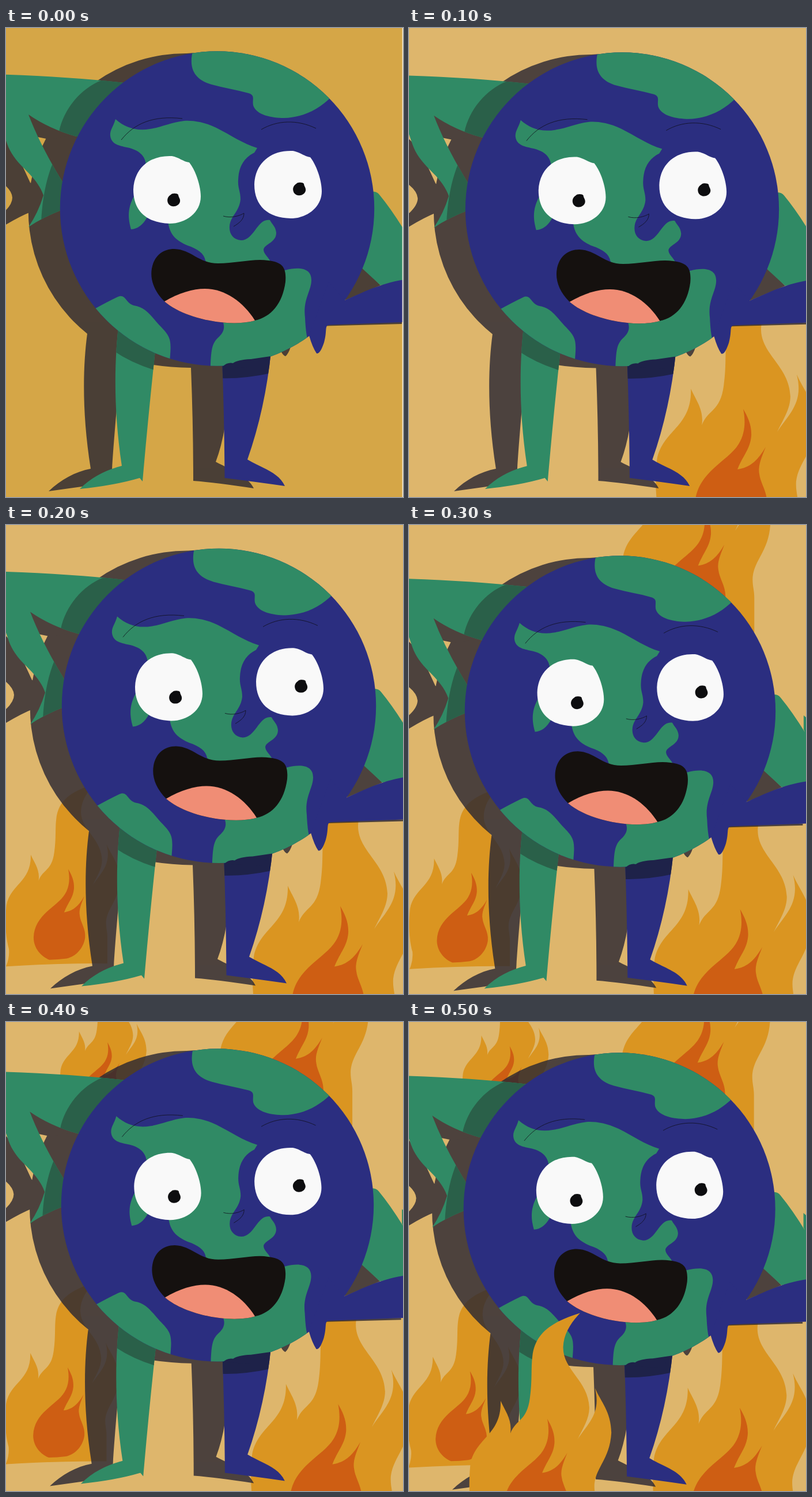
Animation of 689 by 813 pixels, one loop 0.6 s. Source, as an HTML page:

```html
<!DOCTYPE html>
<html lang="en">
<head>
<meta charset="utf-8">
<title>Burning globe</title>
<style>
html, body { margin: 0; width: 100%; height: 100%; overflow: hidden; }
svg { display: block; width: 100vw; height: 100vh; }
.land { fill: #308a65; }
.sea { fill: #2b2e80; }
.landShade { fill: #2a6049; }
.seaShade { fill: #1e2249; }
.shadow { fill: #292632; opacity: .8; }
.eye { fill: #f9f9f9; }
.dark { fill: #15110f; }
.pupil { fill: #0d0d0f; }
.line { fill: none; stroke: #10101c; stroke-width: .8; }
</style>
</head>
<body>
<svg viewBox="0 0 689 813" preserveAspectRatio="none">
  <defs>
    <g id="flame">
      <path fill="#da9521" d="M-151 236 Q-142 215 -144 194 C-152 165 -154 130 -150 88 C-140 36 -89 32 -91 -35
        C-82 -15 -68 2 -72 28 C-61 0 -40 5 -34 -40 C-29 -75 -32 -100 -29 -122 C-24 -165 5 -188 64 -206
        C45 -186 32 -165 31 -140 C30 -95 80 -75 82 -22 C82 0 69 19 59 40 C78 10 106 -10 93 -60
        C105 -32 124 -15 125 27 C122 78 96 92 92 126 C91 142 95 150 95 165 V229 Q-20 228 -151 236Z"/>
      <path fill="#ce5e13" d="M0 0 C8 14 15 28 14 47 C12 70 0 80 -10 105 C10 102 24 92 39 66
        C33 82 25 98 28 113 C30 130 43 145 41 166 C38 190 20 212 -4 217 Q-25 220 -46 220
        C-66 212 -84 192 -84 166 C-82 110 -27 92 -8 61 C4 42 4 20 0 0Z"/>
    </g>
    <clipPath id="disc"><circle cx="366.5" cy="313" r="272.7"/></clipPath>
    <path id="arm" d="M-10 80.5 Q105 84 205 95 L250 200 L122 188 Q75 175 39 150 Q60 205 100 270 V314
      Q62 329 39 345 Q56 320 65 290 C58 270 44 256 27 239 C12 223 5 211 0 195 L-10 165Z"/>
    <clipPath id="armArea"><use href="#arm"/></clipPath>
    <path id="landLeg" d="M196 510 C188 575 186 660 201 759 C175 766 150 777 128 799 Q188 793 232 780 L237 786 Q246 680 260 550Z"/>
    <path id="seaLeg" d="M375 570 Q379 680 379.5 780 Q435 787 484 794 C473 770 446 764 419 748 Q450 660 460 560Z"/>
    <clipPath id="legArea"><use href="#landLeg"/><use href="#seaLeg"/></clipPath>
  </defs>

  <rect id="sky" width="689" height="813"/>
  <g id="scene">
    <g id="back"></g>

    <g class="shadow">
      <path d="M313 44 A273 273 0 0 0 141 530 C133 590 132 670 147 764 C120 769 95 783 74 803 L135 794.5 L184 785
        V766 C186 730 191 670 200 572 Q255 588 321 589 Q325 690 325 785 Q365 788 430 798 C420 776 386 764 364 752
        Q374 726 380 690 L383 585 A273 273 0 0 0 313 44Z"/>
      <path d="M30 140 L125 185 L75 193 L50 188Z"/>
      <path d="M-10 185 L0 195 L22 225 L42 268 L70 290 L45 318 Q20 328 -10 347 V325 Q11 308 11 294 Q10 280 -10 266Z"/>
      <path d="M588 472 L616 412 L650 446Z M477 560 Q481 568 485 569 Q490 565 494 553Z M556 510 H687 V513 L556 516.5Z"/>
    </g>

    <use href="#arm" class="land"/>
    <path class="landShade" clip-path="url(#armArea)" d="M92 180 C100 140 130 105 165 91 L230 85 V200 H92Z
      M61 337 C63 290 72 255 83 230 L120 270 V330Z"/>
    <path class="land" d="M630 284 Q643 282 648 289 Q672 318 700 365 V437 L650 446 L600 400Z M688.5 320 L700 330 V370 L688.5 345Z"/>

    <use href="#landLeg" class="land"/>
    <use href="#seaLeg" class="sea"/>
    <g clip-path="url(#legArea)">
      <path class="landShade" d="M180 555 Q217 582 265 595 V480 H180Z"/>
      <path class="seaShade" d="M370 607 Q415 609 470 596 V540 H370Z"/>
    </g>

    <circle class="sea" cx="366.5" cy="313" r="272.7"/>
    <g class="land" clip-path="url(#disc)">
      <path d="M325 36 C317 66 323 88 357 98 C378 104 400 107 421 113 C433 117 427 123 429 134 C434 151 462 156 482 156 C515 155 542 142 565 119 L540 30Z"/>
      <path d="M190 158 C186 172 180 177 181 187 C183 202 197 204 210 207 C230 211 242 221 243 238 L270 290
        L281 335 C284 360 297 369 315 377 C333 383 344 391 346 403 L380 450 L484 420
        C511 413 530 417 530 437 C530 456 515 470 519 502 Q520 526 523 538 L500 610 H354
        C356 560 355 548 370 535 C377 528 381 520 376 508 L470 430 L458 403
        C454 396 447 391 447 384 C449 374 469 372 469 355 C468 344 462 341 458 333
        C436 329 431 368 408 368 C394 367 387 356 388 344 C389 326 405 319 407 297 C407 283 402 278 403 263
        C404 238 415 224 431 216 L436 208 C410 200 391 186 365 173 C342 162 322 160 309 161
        C285 164 270 172 250 175 C226 179 207 173 190 158Z"/>
      <path d="M226 285 C212 307 210 325 217 349 Q234 348 245 328Z"/>
      <path d="M150 489 Q175 475 194 466 C208 460 207 477 222 481 C243 484 252 500 266 515 C288 537 287 541 284 580 L200 600Z"/>
    </g>
    <path class="seaShade" d="M376 587 Q384 579 394 581 Q402 575 425 574 L459 569 L440 590Z"/>
    <path class="sea" d="M560 440 L588 472 C620 458 655 440 700 435 V509.5 L562 514.5 C552 515 558 524 552 545 Q545 566 539 564 Q532 554 526 533Z"/>

    <g id="eyes"></g>
    <g class="line">
      <path d="M200 194 C222 166 255 151 306 157 M443 176 C470 160 505 158 538 174"/>
      <path d="M377 326 C390 330 405 326 413 321 C413 332 405 338 395 344"/>
    </g>
    <path class="dark" d="M292 383 C322 384 334 408 368 408 C400 408 430 399 455 403 C480 406 487 415 485 440
      C480 478 460 501 432 507 C392 519 312 506 275 474 C256 455 250 435 253 417 C257 395 272 383 292 383Z"/>
    <path fill="#f08d75" d="M275 474 C300 459 325 452 345 452 C380 452 412 475 432 507 C392 519 312 506 275 474Z"/>

    <g id="front"></g>
  </g>
  <rect id="edge" x="687.7" width="1.3" height="813" fill="#f6efe0"/>
</svg>
<script>
const $ = id => document.getElementById(id);
const STEP = 100;

// camera per step: scale x, scale y, shift x, shift y
const poses = [
  [1, 1, 0, 0],
  [.998, .9974, 4.2, 2.1],
  [1, 1, 3, .4],
  [.989, .989, 4, 13.4],
  [.9945, .994, 2.5, 6.3],
  [.992, .993, 1.6, 13.3]
];

// each flame: layer, x and y of its inner tip, size, step at which it appears
const flames = [
  ["back", 577, 660, 1, 1],
  ["back", 105, 596, .715, 2],
  ["back", 512.6, -41, .94, 3],
  ["back", 174.5, 29, .545, 4],
  ["front", 240.3, 679.5, .897, 5]
].map(([layer, x, y, size, from]) => {
  const node = add($(layer), "use", {
    href: "#flame",
    transform: `translate(${x} ${y}) scale(${size})`
  });
  return { node, from };
});

function add(parent, tag, attrs) {
  const node = document.createElementNS("http://www.w3.org/2000/svg", tag);
  for (const key in attrs) node.setAttribute(key, attrs[key]);
  return parent.appendChild(node);
}

function eye(x, y, pupilX, pupilY) {
  add($("eyes"), "path", {
    class: "eye",
    transform: `translate(${x} ${y})`,
    d: "M8 -58 C20 -56 28 -48 38 -47 C50 -32 58 -5 58 12 C58 40 32 59 4 59 C-35 58 -59 38 -59 0 C-58 -35 -32 -60 8 -58Z"
  });
  add($("eyes"), "path", {
    class: "pupil",
    transform: `translate(${pupilX} ${pupilY})`,
    d: "M-5 -9 C-3 -12 6 -12 8 -9 C8 -5 12 -2 11 3 C9 12 -4 14 -9 7 C-13 0 -10 -6 -5 -9Z"
  });
}
eye(280, 280, 291, 298);
eye(490, 271, 509, 279);

function draw(time) {
  const step = Math.floor(time / STEP) % poses.length;
  const [sx, sy, dx, dy] = poses[step];
  $("scene").setAttribute("transform", `matrix(${sx} 0 0 ${sy} ${dx} ${dy})`);
  $("sky").setAttribute("fill", step ? "#deb66c" : "#d5a647");
  $("edge").style.display = step ? "none" : "";
  for (const { node, from } of flames) node.style.display = step >= from ? "" : "none";
}

const start = performance.now();
function tick() {
  draw(performance.now() - start);
  requestAnimationFrame(tick);
}
tick();
</script>
</body>
</html>
```
